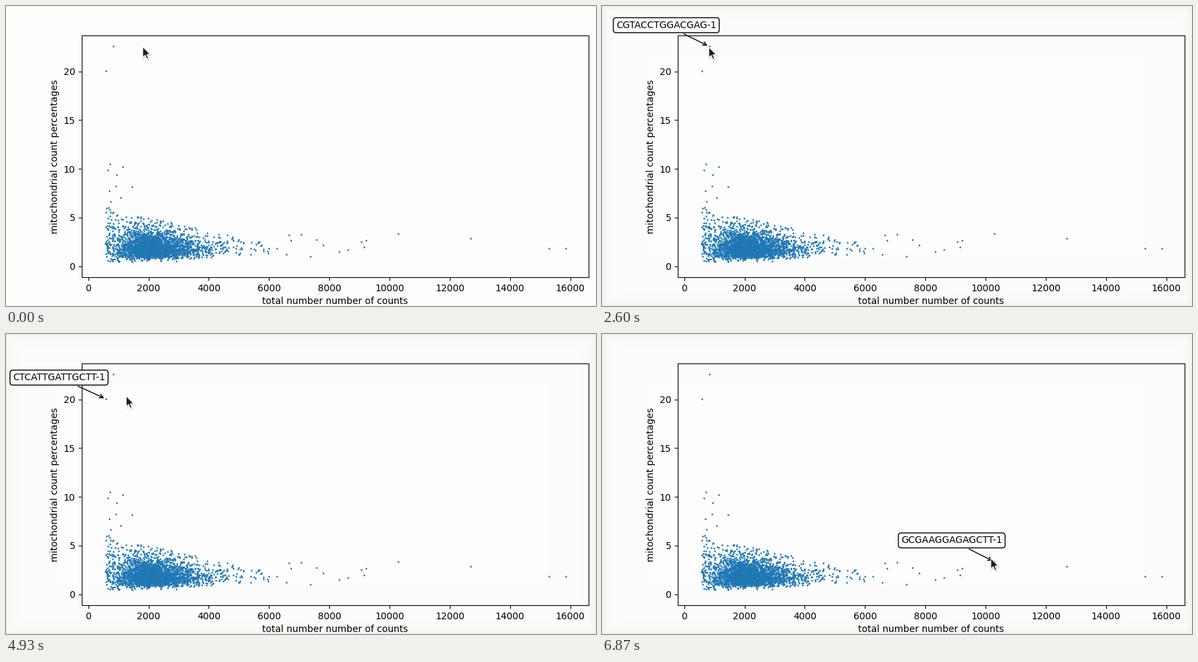
A matplotlib script for the animation above (8000 ms loop, 880 by 448 pixels).

```python
import numpy as np
import matplotlib.pyplot as plt
from matplotlib.animation import FuncAnimation
from matplotlib.patches import Polygon

W, H, DPI = 880, 448, 100
LOOP_MS, FRAMES = 8000, 120
STEP_MS = LOOP_MS / FRAMES
PAPER = "#fdfdfd"
LEFT, RIGHT, TOP, BOTTOM = 113, 869, 44, 405
X_RANGE, Y_RANGE = (548, 15844), (0, 22.57)

plt.rcParams.update({"font.family": "DejaVu Sans", "font.size": 10})
rng = np.random.default_rng(7)


def main_cloud(n=2640):
    """Skewed cloud whose vertical spread is widest at low counts."""
    x = 2200 * np.exp(0.33 * rng.standard_t(7, n))
    sigma = 0.37 + 0.25 * np.exp(-(x - 550) / 700)
    y = 1.95 * np.exp(sigma * rng.standard_normal(n))
    floor = 0.4 + 0.25 * np.maximum(x / 1000 - 2.5, 0)
    ceiling = 6.4 - 0.65 * x / 1000
    keep = (x > 560) & (x < 6600) & (y > floor) & (y < ceiling)
    return x[keep], y[keep]


def small_cells(n=90):
    """Cells with few counts, thinning out upwards."""
    x = 560 + rng.exponential(280, n)
    return x, np.minimum(0.5 + rng.exponential(2.6, n), 10.5)


def sparse_tail(n=13):
    return 6500 + rng.exponential(1500, n), rng.uniform(1, 3.4, n)


# Points the viewer hovers over, then the two largest cells
HOVERED = [(828, 22.57), (585, 20.06), (10290, 3.34)]
LARGEST = [(15290, 1.8), (15844, 1.8)]

fig = plt.figure(figsize=(W / DPI, H / DPI), dpi=DPI, facecolor=PAPER)


def stage_axes(zorder):
    layer = fig.add_axes([0, 0, 1, 1], zorder=zorder)
    layer.set(xlim=(0, W), ylim=(H, 0))
    layer.axis("off")
    return layer


def padded(low, high, margin=0.05):
    pad = margin * (high - low)
    return low - pad, high + pad


# Faint shade along the border
backdrop = stage_axes(-1)
gx, gy = np.meshgrid(np.arange(W) + 0.5, np.arange(H) + 0.5)
edge = np.minimum(np.minimum(gx, W - gx), np.minimum(gy, H - gy))
rgba = np.ones((H, W, 4)) * np.array([225, 225, 205, 255]) / 255
rgba[..., 3] = 0.3 * np.exp(-edge / 5) + 0.1 * np.exp(-edge / 22)
shade = backdrop.imshow(rgba, extent=(0, W, H, 0), aspect="auto",
                        interpolation="nearest")

ax = fig.add_axes([LEFT / W, 1 - BOTTOM / H, (RIGHT - LEFT) / W, (BOTTOM - TOP) / H],
                  facecolor="none", zorder=1)
groups = [main_cloud(), small_cells(), sparse_tail(), np.array(HOVERED + LARGEST).T]
xs, ys = np.hstack(groups)
ax.scatter(xs, ys, s=3.6, c="#1f77b4", linewidths=0)
ax.set(xlim=padded(*X_RANGE), ylim=padded(*Y_RANGE),
       xticks=range(0, 16001, 2000), yticks=range(0, 21, 5),
       xlabel="total number number of counts",
       ylabel="mitochondrial count percentages")


def tooltip(label, point):
    return ax.annotate(label, point, xytext=(-100, 20),
                       textcoords="offset points", zorder=10,
                       bbox=dict(boxstyle="round", fc=PAPER, ec="black"),
                       arrowprops=dict(arrowstyle="->"))


# tooltip, shown from and until (ms)
TOOLTIPS = [
    (tooltip("CGTACCTGGACGAG-1", HOVERED[0]), 1800, 2700),
    (tooltip("CTCATTGATTGCTT-1", HOVERED[1]), 3450, 5000),
    (tooltip("GCGAAGGAGAGCTT-1", HOVERED[2]), 6650, 9000),
]

# Mouse pointer
POINTER = np.array([(0, 0), (0, 15.5), (3.5, 12.3), (6, 18), (8.4, 17),
                    (6, 11.3), (11, 11.2)])
overlay = stage_axes(5)
shadow = overlay.add_patch(Polygon(POINTER, fc="#b0b0a8", ec="#d0d0c8",
                                   lw=2, alpha=0.4))
arrow = overlay.add_patch(Polygon(POINTER, fc="#1e1e1e", ec="white", lw=0.7))

# Pointer moves: start and end (ms), destination, ease-out power
START = np.array([204, 61])
EASE_OUT, LINEAR = 1.7, 1
MOVES = [
    (700, 1470, (164, 60), EASE_OUT),
    (1800, 2000, (161, 57), EASE_OUT),
    (2600, 3400, (149, 89), EASE_OUT),
    (4870, 4930, (178, 92), LINEAR),
    (4930, 5730, (504, 266), LINEAR),
    (5730, 6600, (580, 335), EASE_OUT),
]


def pointer_tip(t):
    tip = START
    for begin, end, goal, power in MOVES:
        u = np.clip((t - begin) / (end - begin), 0, 1)
        tip = tip + (np.array(goal) - tip) * (1 - (1 - u) ** power)
    return tip


def update(frame):
    t = (frame + 1) * STEP_MS
    tip = pointer_tip(t)
    arrow.set_xy(POINTER + tip)
    shadow.set_xy(POINTER + tip + np.array([0.8, 1.8]))
    shade.set_visible(t >= 130)
    for note, begin, end in TOOLTIPS:
        note.set_visible(begin <= t <= end)
    return ()


anim = FuncAnimation(fig, update, frames=FRAMES, interval=STEP_MS,
                     repeat=True, repeat_delay=0, blit=False)
plt.show()
```
